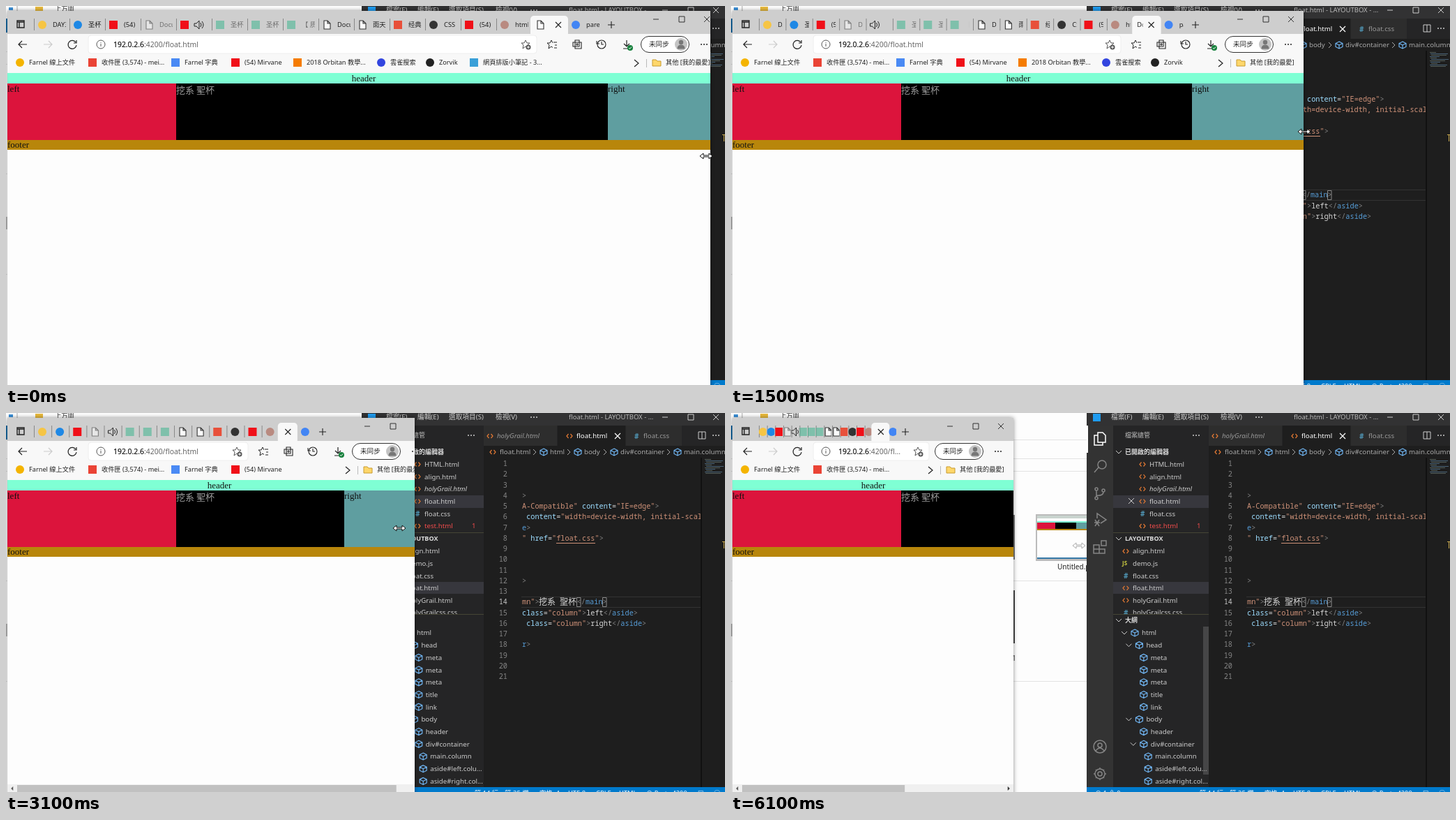
Write an HTML page with a canvas that moves like this. It is 1031 px wide and 543 px high and loops after 6200 ms.

```html
<!DOCTYPE html>
<html lang="zh-Hant">
<head>
<meta charset="utf-8">
<title>Column layout while resizing</title>
<style>
html, body { margin: 0; width: 100%; height: 100%; overflow: hidden; background: #fff; }
canvas { display: block; }
</style>
</head>
<body>
<canvas id="stage" width="1031" height="543"></canvas>
<script>
const ctx = document.getElementById('stage').getContext('2d');
const LOOP = 6200, STEP = 100, HEIGHT = 543;
const UI = '"Noto Sans", "Noto Sans CJK TC", sans-serif';
const SERIF = '"Liberation Serif", serif';
const MONO = '"Noto Sans Mono", "Liberation Mono", monospace';
const CJK = '"Noto Sans CJK TC", sans-serif';

// Motion keys: [time, value, ...]
const edgeKeys = [[0, 1010], [600, 933], [800, 933], [1500, 821], [2000, 746], [2200, 740], [2800, 635],
  [2900, 635], [3100, 586], [3600, 478], [3700, 421], [3900, 405]];
const layoutKeys = [[0, 1023], [600, 991], [700, 933], [800, 933], [1500, 821], [2000, 746], [2200, 740], [2800, 635],
  [2900, 635], [3100, 609], [3600, 480], [3700, 421], [3900, 405]];
const pointerKeys = [[0, 1004, 215], [600, 936, 200], [800, 936, 200], [1500, 822, 180], [2000, 745, 182],
  [2200, 738, 180], [2800, 634, 170], [2900, 634, 170], [3100, 564, 165], [3600, 476, 140], [3700, 425, 132],
  [4000, 404, 126], [4200, 357, 121], [4300, 357, 121], [4800, 295, 121], [5200, 295, 121], [5500, 450, 290],
  [5700, 600, 420], [6000, 620, 530], [6100, 625, 565]];

function at(keys, t) {
  const i = keys.findIndex(k => k[0] > t);
  if (i < 0) return keys[keys.length - 1].slice(1);
  const a = keys[i - 1], b = keys[i], f = (t - a[0]) / (b[0] - a[0]);
  return a.slice(1).map((v, n) => v + (b[n + 1] - v) * f);
}

function rect(x, y, w, h, color) {
  ctx.fillStyle = color;
  ctx.fillRect(x, y, w, h);
}
function round(x, y, w, h, r, fill, stroke) {
  ctx.beginPath();
  ctx.roundRect(x, y, w, h, r);
  if (fill) { ctx.fillStyle = fill; ctx.fill(); }
  if (stroke) { ctx.strokeStyle = stroke; ctx.lineWidth = 1; ctx.stroke(); }
}
function dot(x, y, r, color) {
  ctx.beginPath();
  ctx.arc(x, y, r, 0, 7);
  ctx.fillStyle = color;
  ctx.fill();
}
function text(s, x, y, color, size = 9.7, font = UI, style = '') {
  ctx.font = `${style} ${size}px ${font}`;
  ctx.fillStyle = color;
  ctx.fillText(s, x, y + size * 0.36);
}
function icon(d, x, y, color, width = 1, fill) {
  const path = new Path2D(d);
  ctx.save();
  ctx.translate(x, y);
  if (fill) { ctx.fillStyle = fill; ctx.fill(path); }
  ctx.strokeStyle = color;
  ctx.lineWidth = width;
  ctx.stroke(path);
  ctx.restore();
}
function clipped(x, y, w, h, draw) {
  ctx.save();
  ctx.beginPath();
  ctx.rect(x, y, w, h);
  ctx.clip();
  draw();
  ctx.restore();
}
function dots(x, y, color) {
  for (const d of [-4, 0, 4]) dot(x + d, y, 1, color);
}

const circle = r => `M${r} 0A${r} ${r} 0 1 1 ${-r} 0A${r} ${r} 0 1 1 ${r} 0Z`;
const ICON = {
  close: 'M-4-4L4 4M-4 4L4-4',
  min: 'M-4 0H4',
  max: 'M-4-4H4V4H-4Z',
  plus: 'M-5 0H5M0-5V5',
  right: 'M-2-4L2 0L-2 4',
  down: 'M-4-2L0 2L4-2',
  back: 'M6 0H-6M-1-5L-6 0L-1 5',
  forward: 'M-6 0H6M1-5L6 0L1 5',
  reload: 'M5-3A6 6 0 1 0 6 1M6-6V-2H2',
  doc: 'M-4-6H1L5-2V6H-4ZM1-6V-2H5',
  star: 'M0-6L2-2L6-2L3 1L4 6L0 3L-4 6L-3 1L-6-2L-2-2Z',
  lines: 'M2-3H7M4 1H7M3 5H7',
  collect: 'M-3-6H3V3H-6V-3H6V6H-3ZM0-2V2M-2 0H2',
  clock: circle(6) + 'M0-4V0H3M-7-5V-1H-3',
  download: 'M0-6V3M-4-1L0 3L4-1M-5 6H4',
  speaker: 'M-6-2H-3L1-6V6L-3 2H-6ZM3-3Q5 0 3 3M5-5Q9 0 5 5',
  folder: 'M-6-4H-1L1-2H6V5H-6Z',
  cube: 'M0-5L5-2.5V2.5L0 5L-5 2.5V-2.5ZM-5-2.5L0 0L5-2.5M0 0V5',
  code: 'M-1.5-3L-4 0L-1.5 3M1.5-3L4 0L1.5 3',
  split: 'M-5-5H5V5H-5ZM0-5V5',
  files: 'M-3-9H4L8-5V5H-3ZM-3-5H-8V9H4V5',
  search: 'M-8 9L-2 2M-3-2A6 6 0 1 1 9-2A6 6 0 1 1-3-2',
  branch: 'M-5-4V5M-5 3Q5 4 5-2M-7-6A2 2 0 1 1-3-6A2 2 0 1 1-7-6M-7 7A2 2 0 1 1-3 7A2 2 0 1 1-7 7M3-4A2 2 0 1 1 7-4A2 2 0 1 1 3-4',
  debug: 'M-4-2V-9L9 0L1 5M-8 4H0M-7 0L-1 9M-1 0L-7 9',
  blocks: 'M-9-3H-1V9H-9ZM-9 3H7V9H-1M7 3V9M2-9H9V-2H2Z',
  person: circle(9) + 'M-3-2A3 3 0 1 1 3-2A3 3 0 1 1-3-2M-6 6Q0-2 6 6',
  gear: circle(3) + circle(7) + 'M0-9V-7M0 9V7M-9 0H-7M9 0H7M-6-6L-5-5M6 6L5 5M-6 6L-5 5M6-6L5-5',
  resize: 'M-9 0L-4-4V-1H4V-4L9 0L4 4V1H-4V4Z',
  beam: 'M-3-8H3M0-8V8M-3 8H3'
};

function favicon(kind, color, x, y) {
  if (kind === 'doc') icon(ICON.doc, x, y, '#333', 1.1, '#fafafa');
  else if (kind === 'circle') dot(x, y, 6, color);
  else rect(x - 6, y - 6, 12, 12, color);
}

// --- Folder window in the back ---
function folderWindow() {
  rect(0, 0, 510, HEIGHT, '#fdfdfd');
  rect(0, 18, 2, 20, '#1b6ea8');
  rect(0, 302, 2, 18, '#bbb');
  icon('M16 0V7', 0, 0, '#aaa');
  rect(4, 2, 6, 4, '#3b8fd6');
  rect(42, 1, 11, 6, '#e8b93c');
  text('上方圖', 70, 4, '#333', 9.3);
  for (const y of [38, 65, 83, 240, 384]) rect(0, y, 510, 1, '#e3e3e3');
  rect(404, 146, 3, 64, '#777');
  rect(404, 254, 3, 76, '#444');
  text('1', 403, 351, '#222', 10);
  rect(437, 145, 73, 67, '#bbb');
  rect(439, 147, 71, 62, '#fdfdfd');
  rect(439, 147, 71, 4, '#c9d4cf');
  rect(439, 155, 71, 2, '#7fffd4');
  rect(439, 157, 26, 9, '#dc143c');
  rect(465, 157, 30, 9, '#000');
  rect(495, 157, 15, 9, '#5f9ea0');
  rect(439, 166, 71, 2, '#b8860b');
  rect(439, 207, 71, 2, '#3679a8');
  icon(ICON.resize, 499, 190, '#aaa', 1, '#fff');
  text('Untitled.png', 468, 220, '#222', 10);
}

// --- Code editor ---
const GREY = '#ccc', ORANGE = '#e37933', BLUE = '#519aba', CUBE = '#75beff';

function fileRow(name, x, y, color = GREY, style = '') {
  if (name.endsWith('css')) text('#', x - 3, y, BLUE, 10, UI, 'bold');
  else if (name.endsWith('js')) text('JS', x - 5, y, '#cbcb41', 8, UI, 'bold');
  else icon(ICON.code, x, y, ORANGE, 1.2);
  text(name, x + 10, y, color, 9.7, UI, style);
}
function sectionHead(name, y) {
  icon(ICON.down, 556, y, GREY);
  text(name, 565, y, '#ddd', 9, UI, 'bold');
}

function sidebar(px, py) {
  rect(548, 18, 137, 518, '#252526');
  text('檔案總管', 565, 32, '#bbb', 9);
  dots(667, 32, GREY);
  sectionHead('已開啟的編輯器', 56);
  rect(548, 118, 137, 18, '#37373d');
  icon(ICON.close, 574, 126, GREY);
  ['HTML.html', 'align.html', 'holyGrail.html', 'float.html', 'float.css', 'test.html'].forEach((name, i) =>
    fileRow(name, 590, 73.5 + i * 17.7, i === 5 ? '#f14c4c' : GREY, i === 2 ? 'italic' : ''));
  text('1', 668, 162, '#f14c4c');
  rect(548, 171, 137, 1, '#454535');
  sectionHead('LAYOUTBOX', 180);
  rect(548, 242, 137, 17, '#37373d');
  clipped(548, 172, 137, 116, () =>
    ['align.html', 'demo.js', 'float.css', 'float.html', 'holyGrail.html', 'holyGrailcss.css'].forEach((name, i) =>
      fileRow(name, 566, 198 + i * 17.6)));
  rect(548, 288, 137, 1, '#454535');
  sectionHead('大綱', 297);

  const inOutline = px > 548 && px < 685 && py > 306;
  if (inOutline && py < 536) rect(548, 306 + Math.floor((py - 306) / 17.7) * 17.7, 137, 17.7, '#2a2d2e');
  // A trailing marker means the node has children.
  ['0html+', '1head+', '2meta', '2meta', '2meta', '2title', '2link', '1body+', '2header', '2div#container+',
    '3main.column', '3aside#left.colu...', '3aside#right.col...'].forEach((item, i) => {
    const x = 579 + item[0] * 6.4, y = 315 + i * 17.7;
    if (item.endsWith('+')) icon(ICON.down, x - 15, y, GREY);
    icon(ICON.cube, x, y, CUBE, 1.1);
    text(item.slice(1).replace('+', ''), x + 10, y, GREY);
  });
  if (inOutline) rect(677, 306, 8, 212, 'rgba(121,121,121,.4)');
}

const STRING = '#ce9178', ATTR = '#9cdcfe', TAG = '#569cd6', PUNCT = '#808080', PLAIN = '#d4d4d4';
const CHAR = 6.146, LINE = 15.25;

function codeLine(n, col, ...parts) {
  let x = 740 + col * CHAR;
  for (const [s, color] of parts) {
    text(s, x, 72.5 + (n - 1) * LINE, color, 10.24, MONO);
    x += s.length * CHAR;
  }
}

function codeArea() {
  rect(739, 263, 259, 1, '#333');
  rect(739, 278, 259, 1, '#333');
  ctx.textAlign = 'right';
  for (let n = 1; n <= 21; n++) text(n, 719, 72.5 + (n - 1) * LINE, n === 14 ? '#c6c6c6' : '#858585', 10.24, MONO);
  ctx.textAlign = 'left';
  clipped(739, 64, 259, 470, () => {
    for (const n of [4, 12]) codeLine(n, 0, ['>', PUNCT]);
    codeLine(5, 0, ['A-Compatible"', STRING], [' content', ATTR], ['=', PLAIN], ['"IE=edge"', STRING], ['>', PUNCT]);
    codeLine(6, 1, ['content', ATTR], ['=', PLAIN], ['"width=device-width, initial-scale', STRING]);
    codeLine(7, 0, ['e', TAG], ['>', PUNCT]);
    codeLine(8, 0, ['"', STRING], [' href', ATTR], ['=', PLAIN], ['"float.css"', STRING], ['>', PUNCT]);
    rect(789, 186, 56, 1, STRING);
    codeLine(14, 0, ['mn"', STRING], ['>', PUNCT]);
    text('挖系', 764, 271, PLAIN, 12, CJK);
    text('聖杯', 794, 271, PLAIN, 12, CJK);
    codeLine(14, 12.8, ['</', PUNCT], ['main', TAG], ['>', PUNCT]);
    for (const x of [818.5, 855.5]) round(x, 264.5, 5.5, 13, 0, null, '#888');
    codeLine(15, 0, ['class', ATTR], ['=', PLAIN], ['"column"', STRING], ['>', PUNCT], ['left', PLAIN], ['</', PUNCT], ['aside', TAG], ['>', PUNCT]);
    codeLine(16, 1, ['class', ATTR], ['=', PLAIN], ['"column"', STRING], ['>', PUNCT], ['right', PLAIN], ['</', PUNCT], ['aside', TAG], ['>', PUNCT]);
    codeLine(18, 0, ['r', TAG], ['>', PUNCT]);
  });
  rect(996, 64, 2, 472, '#111');
  for (let i = 0; i < 11; i++) rect(1002 + (i % 3), 66 + i * 2, [9, 14, 22, 25][i * 3 % 4], 1, i % 2 ? '#4a6478' : '#55605c');
  rect(1027, 184, 4, 1, '#c9a94e');
  rect(1029, 184, 1, 10, '#c9a94e');
}

function editor(px, py) {
  rect(510, 0, 521, HEIGHT, '#1e1e1e');
  rect(510, 0, 521, 18, '#323233');
  rect(519, 1, 11, 11, '#1f9cf0');
  [['檔案(F)', 545], ['編輯(E)', 590], ['選取項目(S)', 635], ['檢視(V)', 702]].forEach(([s, x]) => text(s, x, 6, GREY, 9.7));
  dots(757, 6, GREY);
  text('float.html - LAYOUTBOX - ...', 807, 6, '#bbb', 9.5);
  icon(ICON.min, 945, 6, GREY);
  icon(ICON.max, 982, 6, GREY);
  icon(ICON.close, 1018, 6, GREY);

  rect(510, 18, 38, 518, '#333');
  rect(510, 18, 2, 39, '#fff');
  [['files', 37], ['search', 76], ['branch', 115], ['debug', 153], ['blocks', 192], ['person', 478], ['gear', 517]]
    .forEach(([name, y], i) => icon(ICON[name], 529, y, i ? '#858585' : '#fff', 1.5));
  sidebar(px, py);

  rect(685, 18, 346, 29, '#252526');
  rect(685, 18, 105, 29, '#2d2d2d');
  rect(791, 18, 97, 29, '#1e1e1e');
  rect(889, 18, 80, 29, '#2d2d2d');
  fileRow('holyGrail.html', 694, 33, '#999', 'italic');
  fileRow('float.html', 808, 33, '#fff');
  icon(ICON.close, 877, 33, '#fff', 1.2);
  fileRow('float.css', 904, 33, '#999');
  icon(ICON.split, 998, 32, GREY);
  dots(1018, 32, GREY);

  icon(ICON.code, 698, 56, ORANGE, 1.2);
  text('float.html', 708, 56, '#aaa');
  [['html', 771], ['body', 820], ['div#container', 872], ['main.column', 963]].forEach(([s, x]) => {
    icon(ICON.right, x - 13, 56, '#aaa');
    icon(ICON.cube, x, 56, CUBE, 1.1);
    text(s, x + 9, 56, '#aaa');
  });
  codeArea();

  rect(510, 536, 521, 7, '#007acc');
  [['⊗ 1 ⚠ 0', 522], ['第 14 行，第 35 欄', 672], ['空格: 4', 765], ['UTF-8', 806], ['CRLF', 846], ['HTML', 879],
    ['⊘ Port : 4200', 918], ['☐', 992], ['○', 1015]].forEach(([s, x]) => text(s, x, 544.5, '#fff', 9.3));
}

// --- Browser: [icon shape, icon colour, label, sleeping] ---
const RED = '#f00f18', GREEN = '#3fb58e';
const tabs = [
  ['circle', '#f6c544', 'DAY3'], ['circle', '#1e88e5', '圣杯'], ['square', RED, '(54)'], ['doc', '', 'Docu', 1],
  ['square', RED, '‹'], ['square', GREEN, '圣杯', 1], ['square', GREEN, '圣杯', 1], ['square', GREEN, '【 质', 1],
  ['doc', '', 'Docu'], ['doc', '', '雨天'], ['square', '#e8503a', '经典'], ['circle', '#333', 'CSS'],
  ['square', RED, '(54)'], ['circle', '#b98a80', 'html'], ['doc', '', 'Docu'], ['circle', '#4285f4', 'parent']];
const ACTIVE = 14, SOUND = 4;

// [icon shape, icon colour, icon x, label, right end]
const bookmarks = [
  ['circle', '#f4b400', 20, 'Farnel 線上文件', 105], ['square', '#ea4335', 124, '收件匣 (3,574) - mei...', 225],
  ['square', '#4a8af4', 243, 'Farnel 字典', 310], ['square', RED, 329, '(54) Mirvane', 398],
  ['square', '#f57c00', 418, '2018 Orbitan 教學...', 518], ['circle', '#3245df', 538, '雲雀搜索', 589],
  ['circle', '#222', 608, 'Zorvik', 652], ['square', '#3aa0d8', 671, '網頁排版小筆記 - 3...', 773]];

function tabStrip(size) {
  rect(2, 7, 1040, 33, '#cecece');
  icon('M-5-5H5V5H-5ZM-5-3H5M-2-3V5', 21, 26, '#222', 1.4);
  const total = size - 207;
  const activeWidth = Math.max(total / 16, 23), pitch = (total - activeWidth) / 15;
  let x = 40;
  tabs.forEach(([kind, color, label, sleeping], i) => {
    const isActive = i === ACTIVE, w = isActive ? activeWidth : pitch;
    if (isActive) round(x - 2, 14, w + 3, 30, 5, '#f8f8f8');
    else if (i !== ACTIVE + 1) rect(x, 18, 1, 17, '#888');
    clipped(x, 12, w - 1, 28, () => {
      const left = x + Math.min(12, w / 2);
      if (isActive) {
        if (w > 44) favicon(kind, color, left, 27);
        else if (w > 30) clipped(x, 12, w - 25, 28, () => text(label, x + 5, 27, '#222', 9.3));
        icon(ICON.close, w > 30 ? x + w - 13 : x + w / 2, 27, '#222', 1.1);
        return;
      }
      ctx.globalAlpha = sleeping ? 0.55 : 1;
      const wide = pitch > 45;
      if (i !== SOUND || wide) favicon(kind, color, left, 27);
      if (i === SOUND) icon(ICON.speaker, left + (wide ? 20 : 0), 27, '#222');
      if (pitch > 30) clipped(x, 12, w - 5, 28, () => text(label, left + (i === SOUND ? 34 : 15), 27, '#222', 9.3));
    });
    x += w;
  });
  icon(ICON.plus, x + 12, 27, '#222', 1.1);
  icon(ICON.min, size - 91, 19, '#333');
  icon(ICON.max, size - 54, 19, '#333');
  icon(ICON.close, size - 18, 19, '#333');
}

function toolbar(size) {
  rect(2, 40, 1040, 56, '#f8f8f8');
  icon(ICON.back, 24, 55, '#222', 1.2);
  icon(ICON.forward, 60, 55, '#ccc', 1.2);
  icon(ICON.reload, 95, 55, '#222', 1.2);

  const narrow = size < 480, starX = size - (narrow ? 137 : 278);
  round(118, 42, starX + 16 - 118, 26, 4, '#fff', '#eee');
  icon(circle(6) + 'M0-1V3M0-3V-2', 136, 55, '#555');
  const host = '192.0.2.6', address = host + ':4200/float.html';
  ctx.font = `10.4px ${UI}`;
  let shown = address;
  for (let n = address.length; ctx.measureText(shown).width > starX - 20 - 154; n--) shown = address.slice(0, n) + '...';
  text(shown, 154, 55, '#666', 10.4);
  text(host, 154, 55, '#222', 10.4);
  icon(ICON.star, starX, 55, '#555');
  dot(starX + 4, 59, 3.5, '#555');
  icon('M-2 0H2M0-2V2', starX + 4, 59, '#fff');

  if (!narrow) {
    icon(ICON.star, size - 241, 55, '#222');
    rect(size - 239, 52, 7, 10, '#f8f8f8');
    icon(ICON.lines, size - 240, 55, '#222', 1.2);
    icon(ICON.collect, size - 204, 55, '#222', 1.1);
    icon(ICON.clock, size - 169, 55, '#222', 1.1);
    icon(ICON.download, size - 133, 55, '#222', 1.2);
    dot(size - 128, 60, 4, '#16803c');
    icon('M-2 0L-.5 1.5L2-1.5', size - 128, 60, '#fff');
  }
  round(size - 112.5, 43.5, 69, 23, 11.5, '#fff', '#333');
  text('未同步', size - 101, 55, '#222', 9.6);
  dot(size - 55, 55, 9, '#c4c4c4');
  dot(size - 55, 52, 3.2, '#777');
  icon('M-5 6Q-5 1 0 1Q5 1 5 6Z', size - 55, 55, '#777', 1, '#777');
  dots(size - 22, 55, '#222');

  for (const [kind, color, x, label, end] of bookmarks) {
    if (end > size - 125) break;
    favicon(kind, color, x, 81);
    text(label, x + 13, 81, '#222', 9.2);
  }
  icon('M-3-5L3 0L-3 5', size - 119, 82, '#222', 1.2);
  rect(size - 105, 76, 1, 12, '#bbb');
  icon(ICON.folder, size - 90, 81, '#c79a2e', 1, '#ffd76b');
  text('其他 [我的最愛]', size - 77, 81, '#222', 9.2);
}

function page(size) {
  const rightX = Math.max(size - 160, 485);
  rect(2, 96, 1040, HEIGHT, '#fdfdfd');
  rect(2, 96, size, 15, '#7fffd4');
  rect(2, 111, 242, 81, '#dc143c');
  rect(244, 111, rightX - 244, 81, '#000');
  rect(rightX, 111, 160, 81, '#5f9ea0');
  rect(2, 192, size, 14, '#b8860b');
  ctx.textAlign = 'center';
  text('header', size / 2 + 1.5, 103.5, '#111', 13, SERIF);
  ctx.textAlign = 'left';
  text('left', 2, 118, '#111', 13, SERIF);
  text('挖系 聖杯', 244, 120, '#999', 13, CJK);
  text('right', rightX, 118, '#111', 13, SERIF);
  text('footer', 2, 198.5, '#111', 13, SERIF);

  if (size < 643) {
    rect(2, 532, size, 11, '#f0f0f0');
    rect(16, 533, (size - 33) * (size - 2) / 643, 10, '#c1c1c1');
    icon('M1-2.5L-1.5 0L1 2.5Z', 9, 538, '#555', 0.5, '#555');
    icon('M-1-2.5L1.5 0L-1 2.5Z', size - 7, 538, '#333', 0.5, '#333');
  }
}

function browser(edge, size) {
  ctx.save();
  ctx.shadowColor = 'rgba(0,0,0,.45)';
  ctx.shadowBlur = 6;
  rect(2, 7, edge - 2, HEIGHT, '#fdfdfd');
  ctx.restore();
  clipped(2, 7, edge - 2, HEIGHT, () => {
    tabStrip(size);
    toolbar(size);
    page(size);
  });
}

function pointer(t, x, y) {
  if (t < 4100) icon(ICON.resize, x, y, '#111', 1, '#fff');
  else if (t < 5400) icon(ICON.beam, x, y, '#fff');
  else icon('M0 0V13L3 10L5 15L7 14L5 9H9Z', x, y, '#111', 1, '#fff');
}

function frame(now) {
  const t = Math.floor(now % LOOP / STEP) * STEP;
  const [edge] = at(edgeKeys, t), [size] = at(layoutKeys, t), [px, py] = at(pointerKeys, t);
  folderWindow();
  editor(px, py);
  browser(Math.round(edge), Math.round(size));
  pointer(t, px, py);
  requestAnimationFrame(frame);
}
requestAnimationFrame(frame);
</script>
</body>
</html>
```
